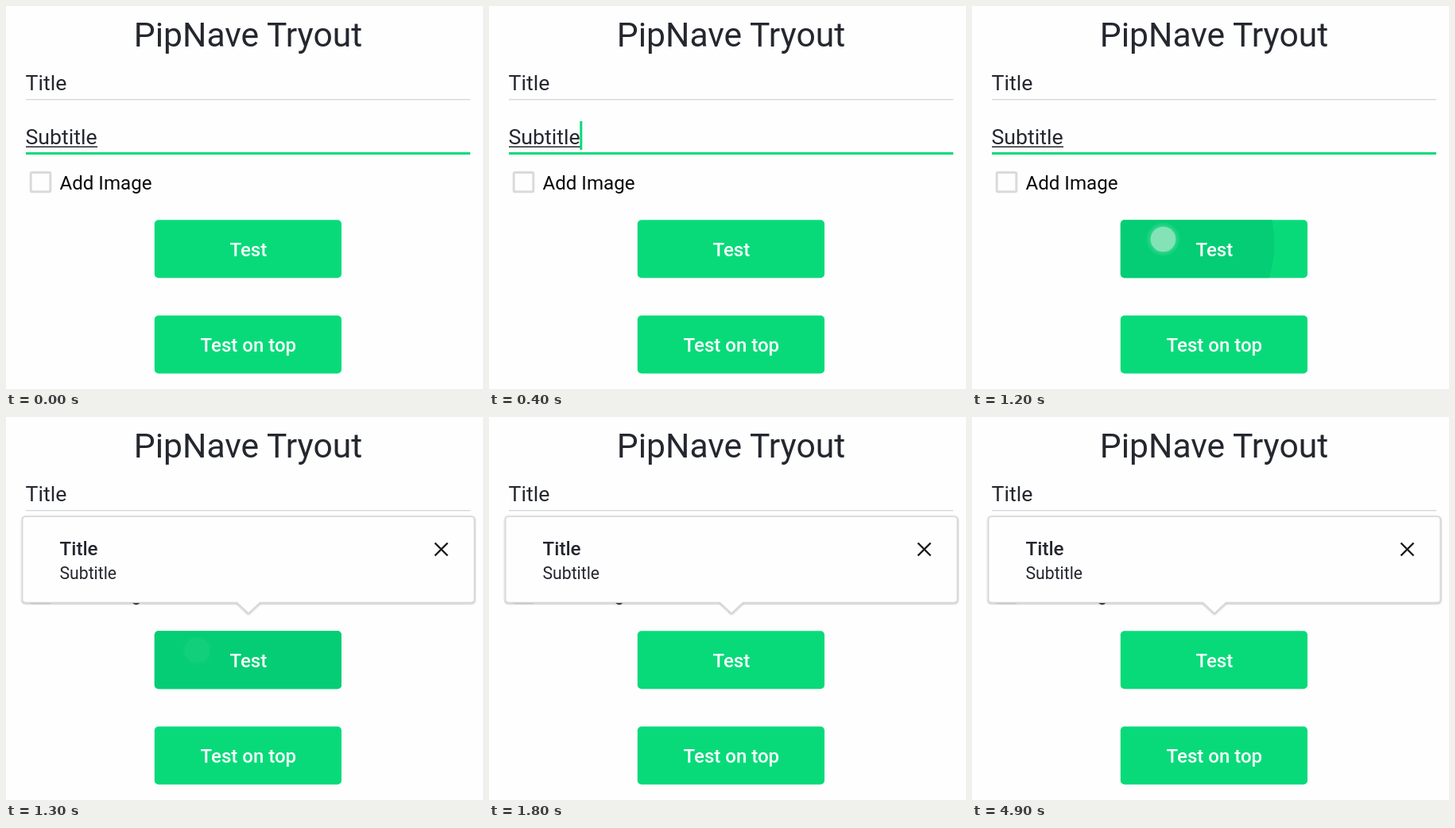
Write an HTML page that moves like this. It is 600 by 482 pixels and loops after 5000 ms.

```html
<!DOCTYPE html>
<html lang="en">
<head>
<meta charset="utf-8">
<title>Popover demo</title>
<style>
  html, body { margin: 0; width: 100%; height: 100%; overflow: hidden; background: #fdfefd; }
  svg { display: block; width: 100%; height: 100%; }
  text { font-family: Roboto, sans-serif; fill: #25272f; }
  .mid { text-anchor: middle; }
  .button { font-size: 24px; font-weight: 500; fill: #fbfffd; }
</style>
</head>
<body>
<svg viewBox="0 0 600 482">
  <defs>
    <clipPath id="buttonClip"><rect x="186.8" y="269.3" width="235.2" height="72.9" rx="5"/></clipPath>
    <radialGradient id="glow">
      <stop offset=".6" stop-color="#9cecc8" stop-opacity=".4"/>
      <stop offset="1" stop-color="#9cecc8" stop-opacity="0"/>
    </radialGradient>
    <filter id="shadow" x="-5%" y="-10%" width="110%" height="125%">
      <feDropShadow dx="0" dy="0.8" stdDeviation="1.3" flood-color="#000" flood-opacity=".36"/>
    </filter>
  </defs>

  <rect width="600" height="482" fill="#fdfefd"/>
  <text class="mid" x="304.5" y="51" font-size="42.6">PipNave Tryout</text>

  <text x="24.5" y="105.7" font-size="26.7">Title</text>
  <rect x="25" y="117" width="559" height="1.4" fill="#d6d8da"/>

  <text x="24.5" y="173.5" font-size="26.7">Subtitle</text>
  <rect x="25" y="176.5" width="90" height="1.5" fill="#25272f"/>
  <rect x="25" y="184" width="559" height="3" fill="#08da7a"/>
  <rect id="caret" x="114.3" y="145" width="3" height="36" fill="#08da7a"/>

  <rect x="31.2" y="209.5" width="24.6" height="24.3" rx="1.5" fill="none" stroke="#dadada" stroke-width="3"/>
  <text x="67.5" y="231" font-size="24.1" style="fill:#08080a">Add Image</text>

  <g fill="#08da7a">
    <rect x="186.8" y="269.3" width="235.2" height="72.9" rx="5"/>
    <rect x="186.8" y="389.6" width="235.2" height="72.9" rx="5"/>
  </g>
  <g clip-path="url(#buttonClip)">
    <circle id="ripple" cx="240.5" cy="299" fill="#05cd75"/>
  </g>
  <text class="mid button" x="304.8" y="315">Test</text>
  <text class="mid button" x="304.8" y="435">Test on top</text>

  <g id="touch">
    <circle cx="240.5" cy="293.5" r="22" fill="url(#glow)"/>
    <circle cx="240.5" cy="293.5" r="15.8" fill="#83e3b6"/>
  </g>

  <g id="popover">
    <path d="M25 125.3H585Q589.2 125.3 589.2 129.5V229.5Q589.2 233.5 585 233.5H319.5L305 247L290.5 233.5H25Q20.6 233.5 20.6 229.5V129.5Q20.6 125.3 25 125.3Z"
      fill="#fdfefd" stroke="#d6d8d7" stroke-width="1.6" stroke-linejoin="round" filter="url(#shadow)"/>
    <text x="67.5" y="174" font-size="24.2" font-weight="500">Title</text>
    <text x="67.5" y="204" font-size="21.2">Subtitle</text>
    <path d="M539.5 158.5L555.5 174.5M555.5 158.5L539.5 174.5" stroke="#17191c" stroke-width="2.4"/>
  </g>
</svg>
<script>
  const LOOP = 5000, STEP = 100, PRESS = 1000, OPEN = 1300;
  const [caret, ripple, touch, popover] =
    ["caret", "ripple", "touch", "popover"].map(id => document.getElementById(id));
  const clamp = v => Math.max(0, Math.min(1, v));
  const show = (el, alpha) => el.setAttribute("opacity", alpha);

  function draw(t) {
    show(caret, t >= 400 && t < 900 ? 1 : 0);
    ripple.setAttribute("r", Math.max(0, Math.min(210, (t - PRESS) * 0.7)));
    show(ripple, clamp((1800 - t) / 400));
    show(touch, t <= PRESS ? 0 : t < OPEN ? 1 : t < OPEN + STEP ? 0.1 : 0);
    show(popover, t >= OPEN ? 1 : 0);
  }

  const start = performance.now();
  function tick() {
    const t = (performance.now() - start) % LOOP;
    draw(Math.floor(t / STEP) * STEP);
    requestAnimationFrame(tick);
  }
  tick();
</script>
</body>
</html>
```
